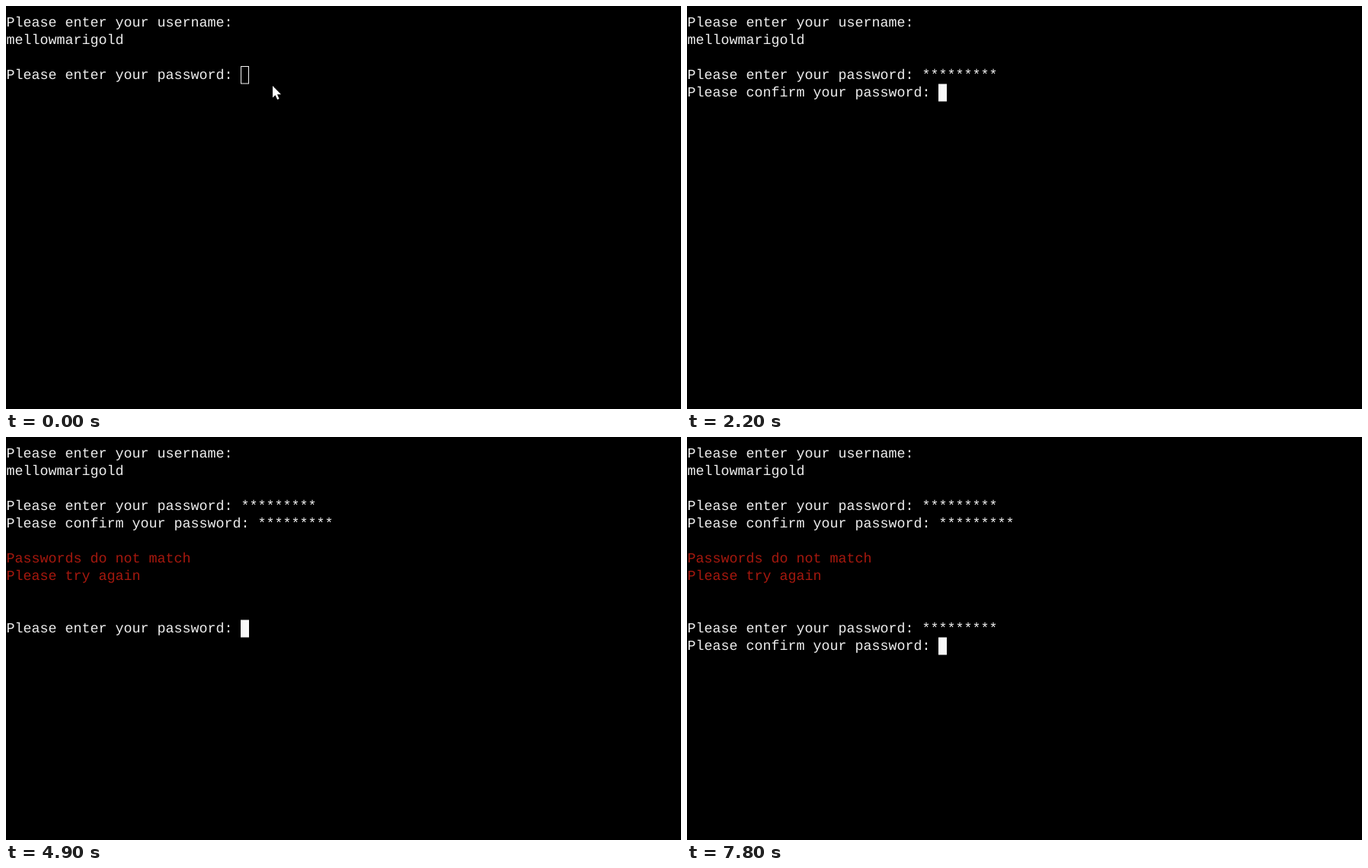
These frames come from a looping animation (886 px wide and 530 px high, 8000 ms). An HTML page:

```html
<!DOCTYPE html>
<html lang="en">
<head>
<meta charset="utf-8">
<title>Password prompt</title>
<style>
  html, body { margin: 0; width: 100%; height: 100%; overflow: hidden; background: #000; }
  svg { display: block; width: 886px; height: 530px; background: #000; }
  text {
    font: 18.33px "Courier New", "Liberation Mono", monospace;
    fill: #eee;
    white-space: pre;
    text-rendering: geometricPrecision;
  }
  .error { fill: #a5180e; }
</style>
</head>
<body>
<svg viewBox="0 0 886 530">
  <g id="lines"></g>
  <rect id="block" width="11" height="23" fill="#f8f8f8"/>
  <g id="idle">
    <rect x="308.5" y="79.5" width="10" height="22.5" fill="none" stroke="#f4f4f4"/>
    <path d="M350 105v15.5l3.5-3.3 2.7 5.8 2.4-1-2.6-5.7h5z" fill="#fff"/>
  </g>
</svg>
<script>
const LOOP = 8000, COL = 11, ROW = 23;
const ENTER = 'Please enter your password: ';
const CONFIRM = 'Please confirm your password: ';

// keys: the time at which each further star appears
const lines = [
  { row: 0, text: 'Please enter your username:' },
  { row: 1, text: 'mellowmarigold' },
  { row: 3, text: ENTER, at: 0, keys: [100, 100, 100, 200, 600, 800, 1000, 1300, 1700] },
  { row: 4, text: CONFIRM, at: 2200, keys: [2600, 2800, 2900, 3100, 3300, 3600, 3800, 4100, 4300] },
  { row: 6, text: 'Passwords do not match', at: 4900, error: true },
  { row: 7, text: 'Please try again', at: 4900, error: true },
  { row: 10, text: ENTER, at: 4900, keys: [5700, 5900, 6100, 6300, 6600, 6800, 7000, 7200, 7500] },
  { row: 11, text: CONFIRM, at: 7800, keys: [] }
];

const byId = id => document.getElementById(id);
const block = byId('block'), idle = byId('idle');

for (const line of lines) {
  line.node = document.createElementNS('http://www.w3.org/2000/svg', 'text');
  line.node.setAttribute('x', 0.5);
  line.node.setAttribute('y', 27 + ROW * line.row);
  if (line.error) line.node.setAttribute('class', 'error');
  byId('lines').append(line.node);
}

function show(node, on) {
  node.setAttribute('visibility', on ? 'visible' : 'hidden');
}

function draw(t) {
  for (const { row, text, at = 0, keys, node } of lines) {
    const on = t >= at;
    const stars = keys ? keys.filter(k => t >= k).length : 0;
    const full = on ? text + '*'.repeat(stars) : '';
    if (node.textContent !== full) node.textContent = full;
    if (on && keys) {
      block.setAttribute('x', full.length * COL);
      block.setAttribute('y', 10.5 + ROW * row);
    }
  }
  const waiting = t < 100;
  show(idle, waiting);
  show(block, !waiting);
}

const start = performance.now();
function tick() {
  draw((performance.now() - start) % LOOP);
  requestAnimationFrame(tick);
}
tick();
</script>
</body>
</html>
```
